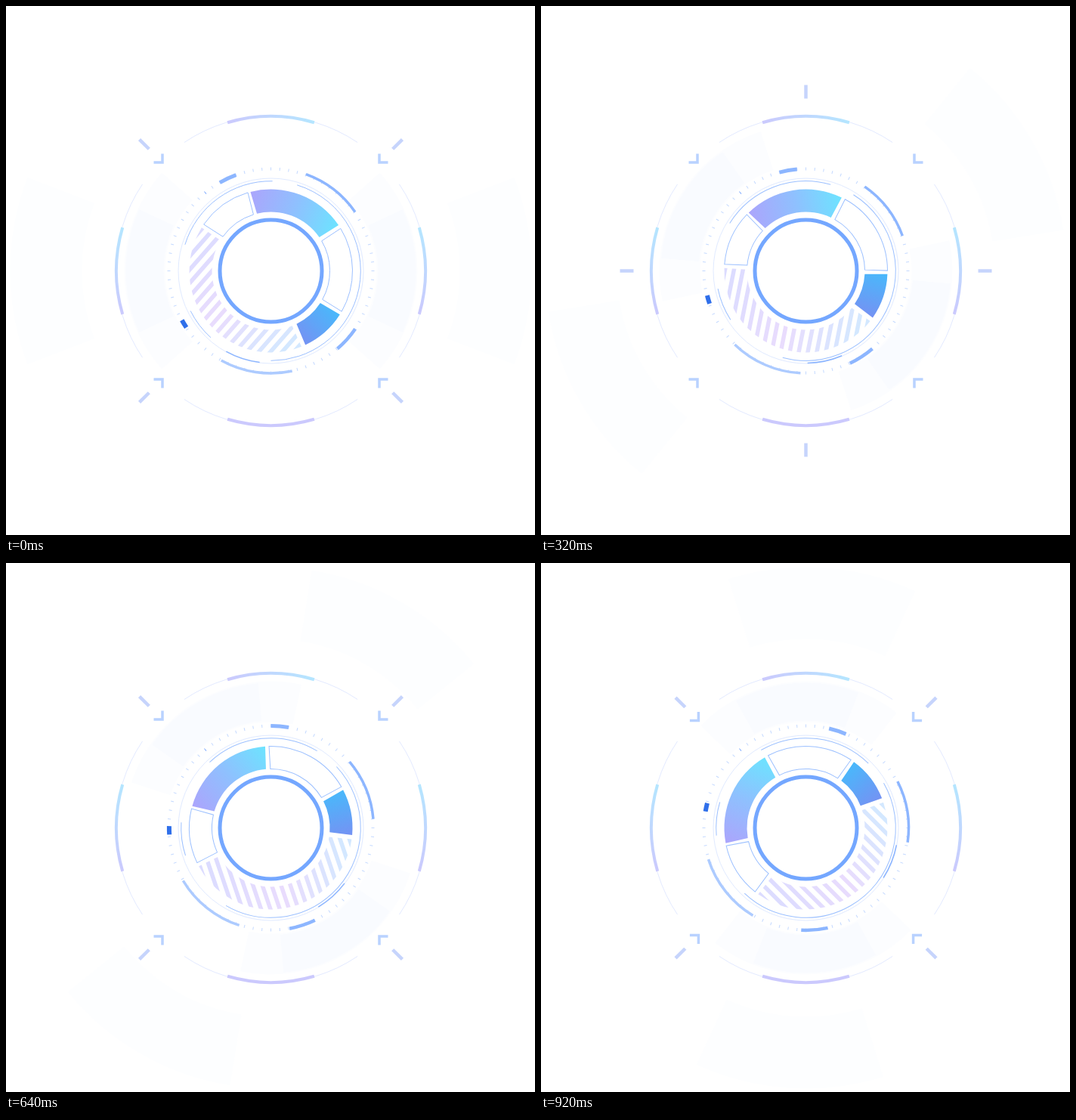
Animation of 700 by 700 pixels, one loop 0.96 s. Source, as an HTML page with a canvas:

```html
<!DOCTYPE html>
<html lang="en">
<head>
<meta charset="utf-8">
<title>Rotating dial</title>
<style>
html, body { margin: 0; width: 100%; height: 100%; overflow: hidden; background: #fff; }
canvas { display: block; width: 700px; height: 700px; }
</style>
</head>
<body>
<canvas id="stage" width="700" height="700"></canvas>
<script>
const LOOP = 960, STEP = 40;
const LAVENDER = '#cbc9fd', CYAN = '#b4e6ff', THIN = '#9cc0ff', PIECE = '#8db6ff';
const ctx = document.getElementById('stage').getContext('2d');
const rad = deg => deg * Math.PI / 180;

function ease(x) {
  x = Math.min(1, Math.max(0, x));
  return x * x * (3 - 2 * x);
}

// Rises from start to peak, then falls back until end.
const pulse = (t, start, peak, end) =>
  ease((t - start) / (peak - start)) * (1 - ease((t - peak) / (end - peak)));

function gradient(x1, y1, x2, y2, ...colors) {
  const g = ctx.createLinearGradient(x1, y1, x2, y2);
  colors.forEach((c, i) => g.addColorStop(i / (colors.length - 1), c));
  return g;
}

function turned(deg, draw) {
  ctx.save();
  ctx.rotate(rad(deg));
  draw();
  ctx.restore();
}

function arc(r, from, to, width, color) {
  ctx.beginPath();
  ctx.arc(0, 0, r, rad(from), rad(to));
  ctx.lineWidth = width;
  ctx.strokeStyle = color;
  ctx.stroke();
}

function line(x1, y1, x2, y2, width, color) {
  ctx.beginPath();
  ctx.moveTo(x1, y1);
  ctx.lineTo(x2, y2);
  ctx.lineWidth = width;
  ctx.strokeStyle = color;
  ctx.stroke();
}

// Path of a ring sector; the inset keeps the gaps parallel.
function sector(from, to, inner = 78, outer = 108, inset = 0.8) {
  ctx.beginPath();
  ctx.arc(0, 0, outer, rad(from), rad(to));
  ctx.arc(0, 0, inner, rad(to - inset), rad(from + inset), true);
  ctx.closePath();
}

function fillSector(color, ...shape) {
  sector(...shape);
  ctx.fillStyle = color;
  ctx.fill();
}

function outlineSector(from, to) {
  sector(from, to);
  ctx.lineWidth = 1;
  ctx.strokeStyle = THIN;
  ctx.stroke();
}

const wide = gradient(-27, -95, 85, -55, '#aaa6fc', '#8fc0fe', '#6ee2ff');
const short = gradient(85, 50, 40, 92, '#48b9fb', '#7592f3');
const hatch = gradient(35, 90, -85, -45, '#d3e8ff', '#e9dcfd', '#dcdcff');

// Colours of the outer arcs, clockwise from the right one.
const rims = [[CYAN, LAVENDER], [LAVENDER, LAVENDER], [LAVENDER, CYAN], [LAVENDER, CYAN]]
  .map(colors => gradient(0, -58, 0, 58, ...colors));

function bands(spin) {
  for (const side of [0, 180]) {
    turned(side - spin, () => fillSector('#fdfeff', -21, 21, 250, 345, 0));
    turned(side + spin, () => {
      fillSector('#fcfdff', -42, 42, 140, 194, 0);
      fillSector('#f9fbff', -25, 25, 142, 192, 0);
    });
  }
}

function frame(t) {
  const swing = 90 * ease(t / 640);
  const tickShift = 9.5 * pulse(t, 640, 800, 960);
  const bracketShift = 4 * pulse(t, 640, 800, 1000);
  rims.forEach((rim, i) => {
    turned(i * 90, () => {
      arc(205, -34, 34, 1, '#e3eaff');
      arc(204.5, -16.3, 16.3, 4, rim);
      const b = 143.5 - bracketShift;
      ctx.beginPath();
      ctx.moveTo(b + 11.5, b);
      ctx.lineTo(b, b);
      ctx.lineTo(b, b + 11.5);
      ctx.lineWidth = 3.5;
      ctx.strokeStyle = '#b9d2ff';
      ctx.stroke();
    });
    turned(i * 90 + 45 + swing, () => {
      const r = 228 - tickShift * Math.SQRT2;
      line(r, 0, r + 18, 0, 4.5, '#c6d4fc');
    });
  });
}

function scale(spin) {
  for (let a = 0; a < 360; a += 5)
    turned(a, () => line(133, 0, 137, 0, 1, a === 230 ? '#7fabff' : '#c4d9ff'));
  arc(122.5, 0, 360, 1, '#e0eaff');
  turned(spin, () => {
    arc(135, -120, -110, 5, PIECE);
    arc(136, -70, -35, 3.5, PIECE);
    arc(135.5, 34.5, 49.5, 4.5, PIECE);
    arc(135.5, 78, 119, 3.5, '#adcbff');
    arc(134.6, 146.2, 151, 6, '#2f6fea');
    arc(118.8, -163, -89, 1, THIN);
    arc(118.8, -73, 90, 1, THIN);
    arc(118.8, 132, 153.5, 1, THIN);
  });
}

function dial() {
  arc(122, 97, 119, 1.5, PIECE);
  fillSector(wide, -104.5, -34);
  outlineSector(-31.3, 29.8);
  fillSector(short, 32.3, 65);
  outlineSector(-145.3, -106.4);

  ctx.save();
  sector(68, 212);
  ctx.clip();
  ctx.beginPath();
  turned(41.25, () => {
    for (let i = -10; i <= 10; i++) ctx.rect(i * 11.7 - 2.75, -120, 5.5, 240);
  });
  ctx.fillStyle = hatch;
  ctx.fill();
  ctx.restore();
}

function render(t) {
  const turn = 90 * t / LOOP;
  ctx.setTransform(1, 0, 0, 1, 0, 0);
  ctx.fillStyle = '#fff';
  ctx.fillRect(0, 0, 700, 700);
  ctx.translate(350.5, 350.5);
  bands(turn);
  frame(t);
  scale(turn / 2);
  turned(-turn, dial);
  arc(67.5, 0, 360, 5, '#74a7ff');
}

function tick() {
  const t = performance.now() % LOOP;
  render(Math.floor(t / STEP) * STEP);
  requestAnimationFrame(tick);
}
tick();
</script>
</body>
</html>
```
